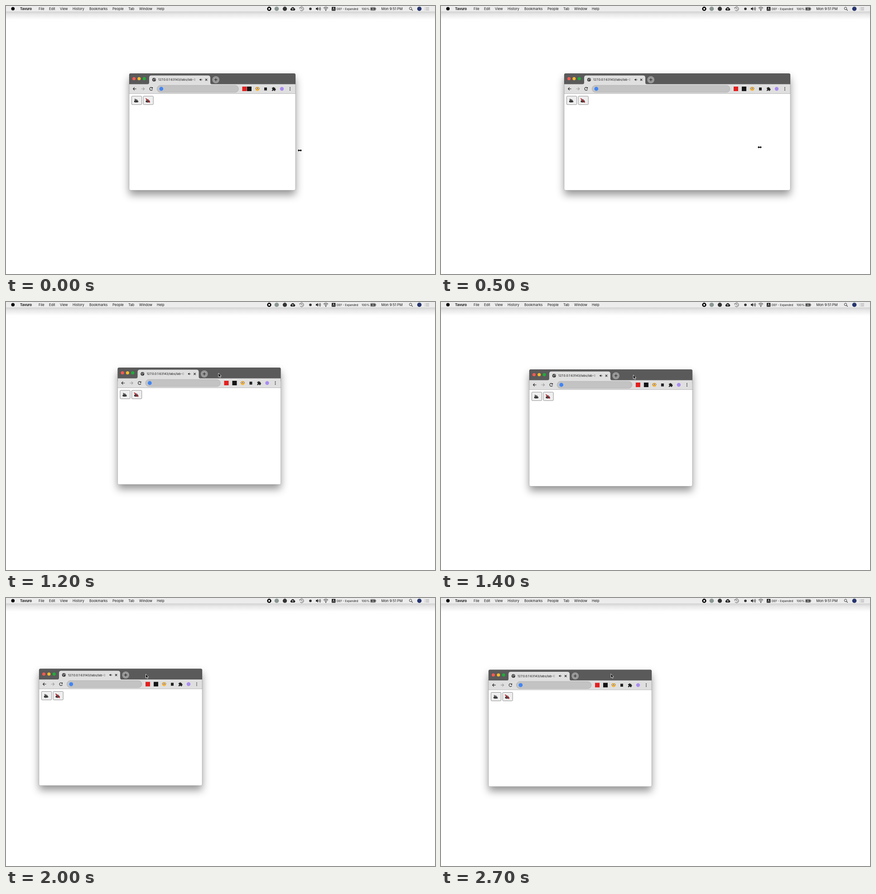
These frames come from a looping animation (947 by 592 pixels, 2800 ms). An HTML page:

```html
<!DOCTYPE html>
<html lang="en">
<head>
<meta charset="utf-8">
<title>Window resize and drag</title>
<style>
  html, body { margin: 0; width: 100%; height: 100%; overflow: hidden; background: #fff; }
  svg { display: block; }
  text { font: 7.6px Inter, Roboto, sans-serif; fill: #161616; }
  .line { fill: none; stroke: #222; stroke-width: 1.1; }
  #frame { filter: drop-shadow(0 10px 9px rgba(0, 0, 0, .42)); }
</style>
</head>
<body>
<svg width="947" height="592" viewBox="0 0 947 592">
  <defs>
    <linearGradient id="barShade" x2="0" y2="1">
      <stop stop-color="#d2d2d2"/><stop offset=".35" stop-color="#e8e8e8"/><stop offset="1" stop-color="#fff"/>
    </linearGradient>
    <linearGradient id="tabFade">
      <stop stop-color="#dfdfdf" stop-opacity="0"/><stop offset="1" stop-color="#dfdfdf"/>
    </linearGradient>
    <g id="button">
      <rect x=".4" y=".4" width="22.2" height="18.7" rx="1.6" fill="#efefef" stroke="#777" stroke-width=".8"/>
      <ellipse cx="9.5" cy="12" rx="3.7" ry="2.4" fill="#222"/>
      <ellipse cx="8.5" cy="8" rx="2.2" ry="1.6" fill="#666" transform="rotate(35 8.5 8)"/>
      <circle cx="13.3" cy="12.3" r="2" fill="#444"/>
      <path d="M9 9l3-1 1.5 3" stroke="#222" fill="none"/>
      <circle cx="9" cy="12.5" r=".8" fill="#bbb"/>
    </g>
  </defs>

  <rect y="12" width="947" height="18" fill="url(#barShade)"/>
  <rect width="947" height="12" fill="#ececec"/>
  <circle cx="15.3" cy="6" r="3.8"/>
  <g id="menu"></g>

  <circle cx="581" cy="6.2" r="4.6"/>
  <rect x="579.3" y="4.5" width="3.4" height="3.4" rx=".5" fill="#fff"/>
  <circle cx="597.5" cy="6.2" r="4.8" fill="#8a9692"/>
  <circle cx="615.5" cy="6.2" r="4.6" fill="#333"/>
  <path d="M630 10a2.6 2.6 0 0 1-.3-5.1a3.6 3.6 0 0 1 6.8 0a2.6 2.6 0 0 1-.3 5.1z" fill="#222"/>
  <path d="M633 9V5m-1.7 1.8L633 5l1.7 1.8" stroke="#fff" stroke-width=".9" fill="none"/>
  <path class="line" d="M648.8 4.5a4.3 4.3 0 1 1 .2 3.8M647.6 3.4l1 1.8 1.8-.8M652.8 3.5v3l2 1" stroke-width=".8" style="stroke-width:.8"/>
  <circle cx="672" cy="6.2" r="2.8" fill="#333"/>
  <path d="M684 4.6h2l2.6-2.4v8L686 7.8h-2z" fill="#222"/>
  <path class="line" style="stroke-width:.9" d="M690 4.6q1.2 1.6 0 3.2M691.6 3.3q2.2 2.9 0 5.8M693.2 2.1q3 4.1 0 8.2"/>
  <path class="line" d="M701 4.7q5-4.4 10 0M702.8 6.6q3.2-2.8 6.4 0M704.5 8.4q1.5-1.3 3 0"/>
  <circle cx="706" cy="9.9" r=".8"/>
  <rect x="719" y="2" width="8.4" height="8.6" rx="1" fill="#222"/>
  <text x="720.7" y="9" style="font-size:7px;fill:#fff">A</text>
  <rect x="804.6" y="3.2" width="11" height="6.4" rx="1.4" class="line" style="stroke-width:.8"/>
  <rect x="805.8" y="4.4" width="8.6" height="4" fill="#222"/>
  <path d="M816.2 5.2v2.4" class="line"/>
  <path d="M810.8 3.8l-2.4 3h1.6l-.7 2.4 2.5-3.1h-1.6z" fill="#fff"/>
  <circle cx="893" cy="5.4" r="2.7" class="line" style="stroke-width:.9"/>
  <path d="M895 7.4l2.8 2.8" class="line"/>
  <circle cx="912.5" cy="6.2" r="4.8" fill="#27356f"/>
  <path d="M924 3.5h1m1.3 0h7.7M924 6.2h1m1.3 0h7.7M924 8.9h1m1.3 0h7.7" class="line" style="stroke:#999;stroke-width:.9"/>

  <g id="win">
    <rect id="frame" height="258" rx="3" fill="#fff" data-trim="0"/>
    <rect height="32" rx="3" fill="#5a5a5a" data-trim="0"/>
    <rect y="23.7" height="20.6" fill="#dfdfdf" data-trim="0"/>
    <rect y="44" height=".9" fill="#b4b4b4" data-trim="0"/>
    <rect height="258" rx="3" fill="none" stroke="#000" stroke-opacity=".25" stroke-width=".7" data-trim="0"/>

    <circle cx="10.5" cy="11.6" r="3.5" fill="#fc5b52"/>
    <circle cx="21.8" cy="11.6" r="3.5" fill="#fdbb2d"/>
    <circle cx="33.2" cy="11.6" r="3.5" fill="#1fae3a"/>
    <path d="M40 24q4 0 4-4V9.500q0-5 5-5H174q5 0 5 5V20q0 4 4 4z" fill="#dfdfdf"/>
    <circle cx="54.8" cy="13.8" r="4" fill="#333"/>
    <path d="M52 12.200l2.500 1.200-1 1.500 1.500 1.500M55.500 10.800l.5 1.800 2.000.6" stroke="#dfdfdf" stroke-width="1" fill="none"/>
    <text x="64" y="16.400" style="font-size:6.800px">127.0.0.1:63143/labs/lab-0</text>
    <rect x="138" y="8" width="12" height="12" fill="url(#tabFade)"/>
    <rect x="150" y="8" width="5" height="12" fill="#dfdfdf"/>
    <path d="M155.300 12.800h1.300l2-1.600v5.200l-2-1.600h-1.300z" fill="#222"/>
    <path d="M160.300 12.500v2.600" class="line" style="stroke-width:.8"/>
    <path d="M167.900 11.700l4.400 4.400m0-4.400l-4.400 4.400" class="line"/>
    <circle cx="191.200" cy="13.800" r="7.900" fill="#999"/>
    <path d="M187.800 13.800h6.800m-3.400-3.400v6.800" class="line"/>

    <path d="M15.600 34H8.600m3.200-3.200L8.600 34l3.200 3.200" class="line"/>
    <path d="M26.600 34h7m-3.200-3.200l3.200 3.200-3.200 3.200" class="line" style="stroke:#999"/>
    <path d="M51 32a3.300 3.300 0 1 0 .4 3.200" class="line"/>
    <path d="M52 30v3.300h-3.300z" fill="#222"/>
    <rect id="address" x="61.300" y="26.200" height="15.600" rx="7.800" fill="#c3c3c3" stroke="#a9a9a9" stroke-width=".7"/>
    <circle cx="70.800" cy="34" r="4.400" fill="#4285f4"/>
    <use href="#button" x="5" y="49.700"/>
    <use href="#button" x="30.600" y="49.700"/>
    <path d="M36.400 55l9 9.500" stroke="#d81e2c" stroke-width="1.700"/>

    <g id="tools">
      <rect x="-107" y="29" width="10" height="10" fill="#151515"/>
      <rect id="slider" x="-125" y="29" width="10" height="10" fill="#e32020"/>
      <circle cx="-84" cy="34" r="4.500" fill="#f6b73c"/>
      <path d="M-88.500 33h9" stroke="#7a4a12" stroke-width=".8"/>
      <circle cx="-86" cy="33" r="1.600" fill="#fff" stroke="#7a4a12" stroke-width=".7"/>
      <circle cx="-82" cy="33" r="1.600" fill="#fff" stroke="#7a4a12" stroke-width=".7"/>
      <rect x="-69" y="31" width="6" height="6.500" fill="#222"/>
      <path d="M-52 31.500h2a1.500 1.500 0 1 1 3 0h2.200v2.200a1.500 1.500 0 1 1 0 3v1.900h-2.300a1.400 1.400 0 0 0-2.800 0H-52v-2.200a1.400 1.400 0 0 0 0-2.800z" fill="#222"/>
      <circle cx="-30" cy="34" r="4.200" fill="#a98bf0"/>
      <g fill="#222"><circle cx="-12" cy="31" r=".9"/><circle cx="-12" cy="34" r=".9"/><circle cx="-12" cy="37" r=".9"/></g>
    </g>
  </g>

  <path id="resize" d="M-4.500 0l3-2.700v1.800h3v-1.800l3 2.700-3 2.700V.9h-3v1.800z" stroke="#fff" stroke-width="1" paint-order="stroke"/>
  <path id="arrow" d="M0 0v8.800l2-1.800 1.400 3.200 1.500-.7-1.400-3h2.700z" stroke="#fff" stroke-width=".8"/>
</svg>
<script>
const LOOP = 2800, STEP = 100;
const $ = id => document.getElementById(id);

const labels = [
  [31, 'Tavuro', 7.7, 700], [72, 'File'], [95, 'Edit'], [119, 'View'], [147, 'History'],
  [184, 'Bookmarks'], [235, 'People'], [270, 'Tab'], [294, 'Window'], [333, 'Help'],
  [730, 'DEF - Expanded', 6.2], [785, '100%', 6.6], [828.5, 'Mon 9:51 PM', 7.7]
];
$('menu').innerHTML = labels.map(([x, label, size = 7.6, weight = 400]) =>
  `<text x="${x}" y="8.9" style="font-size:${size}px;font-weight:${weight}">${label}</text>`).join('');

// Keys: time, then values; linear between keys.
const widths = [[0, 367], [100, 383], [200, 428], [300, 484], [400, 520], [500, 499], [600, 370], [700, 360]];
const places = [[0, 272, 149], [1000, 272, 149], [1100, 265, 147.5], [1200, 246.5, 145],
  [1600, 143.3, 153], [1800, 104, 157], [2000, 73, 156.3], [2300, 21, 153.5], [2400, 16, 153.5],
  [2500, 23, 154], [2600, 56, 156], [2700, 105, 158.4]];
const pointer = [[0, 648.5, 319], [200, 722, 318], [300, 775, 317], [400, 782, 315], [500, 703.5, 312],
  [600, 640, 285], [700, 570, 230], [800, 522, 180], [900, 509, 163], [1000, 507, 161],
  [1100, 494, 159], [1200, 469, 157], [1600, 380, 165], [1800, 340, 169], [2000, 308.500, 168],
  [2300, 256, 165.500], [2400, 252, 165.500], [2500, 272, 166], [2600, 320, 167], [2700, 375, 167.500]];

function at(keys, t) {
  const next = keys.findIndex(key => key[0] > t);
  if (next < 0) return keys[keys.length - 1].slice(1);
  const a = keys[next - 1], b = keys[next];
  const k = (t - a[0]) / (b[0] - a[0]);
  return a.slice(1).map((v, i) => v + (b[i + 1] - v) * k);
}

const move = (id, x, y) => $(id).setAttribute('transform', `translate(${x} ${y})`);
const stretched = document.querySelectorAll('[data-trim]');

function draw(t) {
  const [width] = at(widths, t), [x, y] = at(places, t), [px, py] = at(pointer, t);
  const slide = Math.max(0, 7.5 * (1 - t / 200));
  move('win', x, y);
  move('tools', width, 0);
  move('slider', slide, 0);
  stretched.forEach(el => el.setAttribute('width', width - el.dataset.trim));
  $('address').setAttribute('width', width - 194.500 + slide);

  const resizing = t < 700;
  $('resize').style.display = resizing ? '' : 'none';
  $('arrow').style.display = resizing ? 'none' : '';
  move(resizing ? 'resize' : 'arrow', px, py);
}

const start = performance.now();
function tick() {
  const t = (performance.now() - start) % LOOP;
  draw(Math.floor(t / STEP) * STEP);
  requestAnimationFrame(tick);
}
tick();
</script>
</body>
</html>
```
